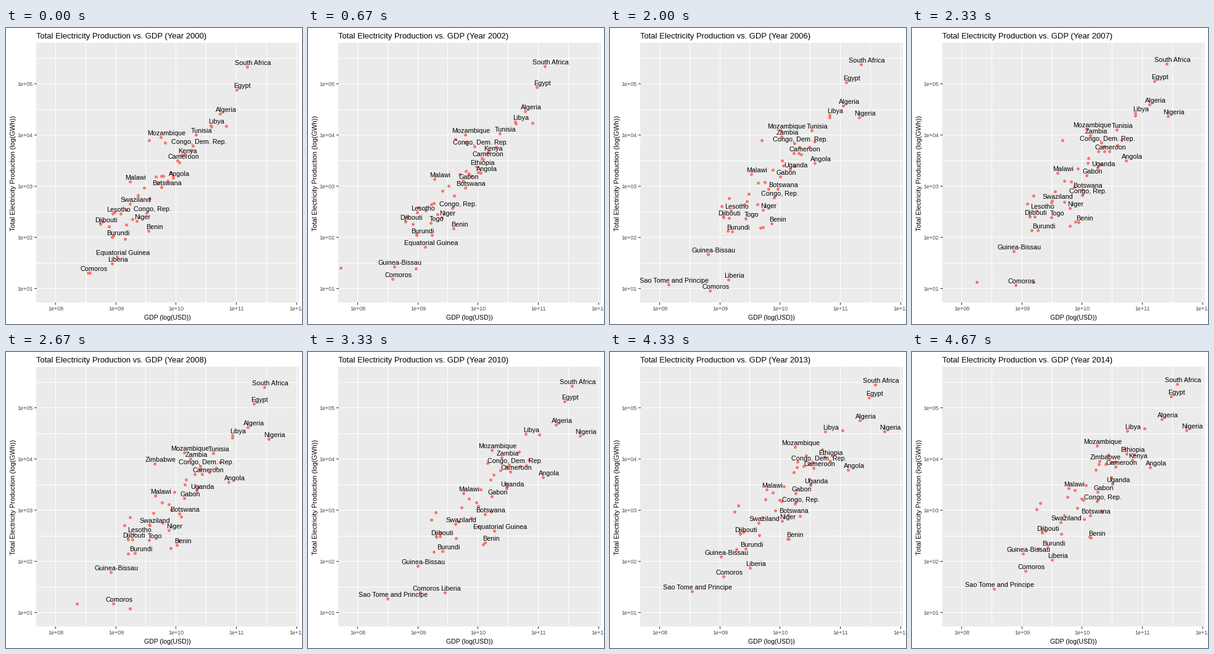
A matplotlib script that plays this animation: 480x480 px, repeating every 5000 ms.

```python
import numpy as np
import matplotlib.pyplot as plt
from matplotlib.animation import FuncAnimation

plt.rcParams["font.family"] = "Liberation Sans"

SIZE = 480
LEFT, TOP, RIGHT, BOTTOM = 49, 24, 475, 445
LAST_YEAR = 14
LOOP, STEP = 5000, 20
paths = {}


def growth(year):
    """Share of the total GDP growth: slow start, quick middle, level end."""
    t = np.minimum(np.asarray(year) / 11.5, 1)
    return t * t * (3 - 2 * t)


def move(name, start, end, mid=None):
    """Lead a country from its 2000 spot to its 2014 spot, maybe through (year, x, y)."""
    keys = [(0, *start), (LAST_YEAR, *end)]
    if mid:
        keys.insert(1, mid)
    paths[name] = np.transpose(keys)


def spot(name, year):
    years, xs, ys = paths[name]
    x = np.interp(growth(year), growth(years), xs)
    y = np.interp(year, years, ys)
    return round(float(x)), round(float(y))


# Alphabetical order decides which of two colliding labels stays.
move("Algeria", (347, 139), (405, 109))
move("Angola", (271, 243), (386, 187))
move("Benin", (231, 329), (290, 301))
move("Botswana", (252, 258), (289, 265))
move("Burundi", (172, 339), (220, 317))
move("Cameroon", (278, 215), (330, 186))
move("Central African Republic", (174, 337), (205, 319))
move("Chad", (193, 342), (288, 300))
move("Comoros", (133, 397), (184, 355), mid=(6, 162, 426))
move("Congo, Dem. Rep.", (303, 191), (329, 178), mid=(2, 270, 192))
move("Congo, Rep.", (228, 300), (300, 242))
move("Djibouti", (153, 318), (211, 293))
move("Egypt", (374, 100), (420, 72), mid=(4, 363, 92))
move("Equatorial Guinea", (180, 371), (308, 258))
move("Ethiopia", (267, 235), (348, 165))
move("Gabon", (247, 251), (301, 227))
move("Guinea-Bissau", (136, 397), (180, 327))
move("Kenya", (285, 206), (357, 175))
move("Lesotho", (173, 301), (217, 290))
move("Liberia", (172, 382), (227, 337), mid=(8, 201, 416))
move("Libya", (332, 158), (349, 128), mid=(8, 367, 135))
move("Malawi", (201, 249), (254, 221))
move("Morocco", (333, 160), (377, 124))
move("Mozambique", (251, 177), (300, 152))
move("Niger", (212, 313), (279, 271))
move("Nigeria", (357, 159), (445, 127))
move("Sao Tome and Principe", (46, 375), (133, 384), mid=(6, 95, 416))
move("South Africa", (391, 63), (430, 52), mid=(2, 384, 62))
move("Swaziland", (201, 285), (241, 276))
move("Togo", (195, 319), (242, 295))
move("Tunisia", (308, 173), (344, 157))
move("Uganda", (255, 240), (325, 214))
move("Zambia", (232, 182), (318, 167))
move("Zimbabwe", (258, 186), (304, 177), mid=(8, 241, 181))
named = list(paths)

# Unlabelled countries crowd around the trend line.
rng = np.random.default_rng(4)
for i, x in enumerate(np.linspace(157, 300, 16)):
    y = 322 - 0.82 * (x - 157) + rng.normal(0, 12)
    move(f"dot {i}", (x, y), (x + rng.uniform(25, 65), y - rng.uniform(15, 60)))

fig = plt.figure(figsize=(SIZE / 72, SIZE / 72), dpi=72, facecolor="white")
ax = fig.add_axes([LEFT / SIZE, 1 - BOTTOM / SIZE, (RIGHT - LEFT) / SIZE, (BOTTOM - TOP) / SIZE],
                  facecolor="#EBEBEB")
ax.set(xlim=(LEFT, RIGHT), ylim=(BOTTOM, TOP), xticks=[], yticks=[])
ax.spines[:].set_visible(False)


def note(x, y, text, px, color="black", **kw):
    return fig.text(x / SIZE, 1 - y / SIZE, text, fontsize=px, color=color, **kw)


def line(x0, y0, x1, y1, color):
    ax.plot([x0, x1], [y0, y1], color=color, lw=1, aa=False, clip_on=False,
            zorder=1, solid_capstyle="butt")


x_grid = [80.5, 129.5, 178.5, 226.5, 275.5, 324.5, 373.5, 422.5, 471.5]
y_grid = [422.2 - 41.5 * i for i in range(10)]
for x in x_grid:
    line(x, TOP, x, BOTTOM, "white")
for y in y_grid:
    line(LEFT, y, RIGHT, y, "white")
for i, x in enumerate(x_grid[::2]):
    line(x, BOTTOM, x, BOTTOM + 3, "#333333")
    note(x, 458, f"1e+{8 + i:02d}", 9, "#4D4D4D", ha="center")
for i, y in enumerate(y_grid[::2]):
    line(LEFT - 3, y, LEFT, y, "#333333")
    note(43, y + 3.8, f"1e+{1 + i:02d}", 9, "#4D4D4D", ha="right")

title = note(49, 17.5, "", 13)
note(262, 473, "GDP (log(USD))", 10.5, ha="center")
note(12, 235, "Total Electricity Production (log(GWh))", 11, ha="center", va="center", rotation=90)

dots, = ax.plot([], [], "o", ms=5, mew=0, color="#F8766D", zorder=2)
labels = {name: ax.text(0, 0, name, fontsize=10.7, ha="center", va="baseline",
                        clip_on=True, zorder=3) for name in named}


def overlaps(a, b):
    return abs(a[0] - b[0]) < a[2] + b[2] and abs(a[1] - b[1]) < 9


def update(frame):
    year = (frame * STEP + 14) * 3 // 1000
    title.set_text(f"Total Electricity Production vs. GDP (Year {2000 + year})")
    points, placed = [], []
    for name in paths:
        x, y = spot(name, year)
        inside = x > LEFT
        if inside:
            points.append((x + 0.5, y - 0.4))
        if name not in labels:
            continue
        box = (x, y, 2.7 * len(name))
        shown = inside and not any(overlaps(box, other) for other in placed)
        if shown:
            placed.append(box)
        labels[name].set_position((x + 9.5, y - 3))
        labels[name].set_visible(shown)
    dots.set_data(*zip(*points))
    return [title, dots, *labels.values()]


anim = FuncAnimation(fig, update, frames=LOOP // STEP, interval=STEP,
                     init_func=lambda: update(0), repeat=True, repeat_delay=0)
plt.show()
```
